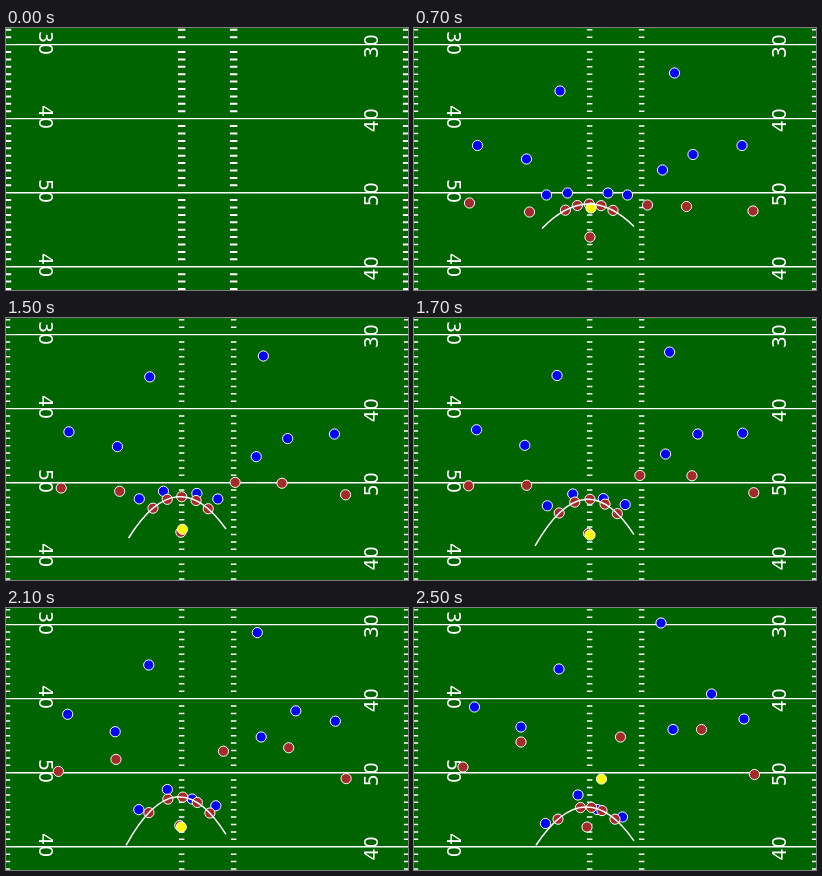
Recreate the animation shown at these times as an HTML page. Size 402 by 262 pixels, loop 2.6 s.

```html
<!DOCTYPE html>
<html lang="en">
<head>
<meta charset="utf-8">
<title>Football play</title>
<style>
  html, body { margin: 0; width: 100%; height: 100%; overflow: hidden; background: #006400; }
  svg { display: block; width: 402px; height: 262px; }
  text { font: 18.97px "DejaVu Sans", sans-serif; fill: #fff; text-anchor: middle; }
  .yard { stroke: #fff; stroke-width: 1.42; }
  .hash { stroke: #fff; stroke-width: 1.5; fill: none; }
  .bold { stroke-width: 2; stroke-linecap: square; }
  circle { stroke: #fff; stroke-width: 1; }
  .blue { fill: #00f; }
  .red { fill: #a52a2a; }
  .ball { fill: #ff0; }
  #pocket { fill: none; stroke: #fff; stroke-width: 1.5; }
</style>
</head>
<body>
<svg viewBox="0 0 402 262">
  <g id="field"></g>
  <g id="play">
    <g id="players"></g>
    <path id="pocket"/>
  </g>
</svg>
<script>
const STEP = 100, LOOP = 2600, SNAP = 7, END = 18, CATCH = 10, THROW = 15;
const $ = id => document.getElementById(id);

function add(parent, tag, attrs, text) {
  const el = document.createElementNS('http://www.w3.org/2000/svg', tag);
  for (const k in attrs) el.setAttribute(k, attrs[k]);
  if (text) el.textContent = text;
  parent.append(el);
  return el;
}

// Field
const TOP = 16.6, GAP = 74.05, SHIFT = 1.6;
let dashes = '';
for (let k = -2; k < 34; k++) {
  if (k % 10 === 0) continue;
  const y = (TOP + k * GAP / 10).toFixed(1);
  for (const x of [-1.3, 172.9, 224.9, 397.9]) dashes += `M${x} ${y}h5.5`;
}
const hash = add($('field'), 'path', { class: 'hash', d: dashes });
[30, 40, 50, 40].forEach((n, i) => {
  const y = TOP + i * GAP;
  add($('field'), 'line', { class: 'yard', x1: 0, x2: 402, y1: y, y2: y });
  add($('field'), 'text', { transform: `translate(39.8 ${y - SHIFT}) rotate(90)`, y: 6.9 }, n);
  add($('field'), 'text', { transform: `translate(365 ${y + SHIFT}) rotate(-90)`, y: 6.9 }, n);
});

// Motion: wait, gain speed evenly for `rise` steps, then run on at full speed
function progress(u, rise = 8, wait = 0) {
  const dist = t => t < rise ? t * t / (2 * rise) : t - rise / 2;
  return dist(Math.max(0, u - wait)) / dist(END - wait);
}
const mix = (a, b, f, bend = 0) => a + (b - a) * f + bend * 4 * f * (1 - f);

function run(x0, y0, x1, y1, { rise, wait, bend = [0, 0] } = {}) {
  return u => {
    const f = progress(u, rise, wait);
    return [mix(x0, x1, f, bend[0]), mix(y0, y1, f, bend[1])];
  };
}

// The pocket is a parabola that deepens and sinks after the snap
function pocketAt(u) {
  const f = progress(u);
  const apex = mix(175, 172.5, f);
  const top = mix(176, 199, progress(u, 12, 3));
  const curve = mix(.0111, .015, f, .004);
  return {
    left: mix(128, 122, f, -4.5), right: 220, apex, top, curve,
    y: x => top + curve * (x - apex) ** 2
  };
}

// Linemen stay on the pocket line, bowing outwards
const lineman = (slot, endX) => u => {
  const x = mix(175.2 + 11.9 * slot, endX, progress(u, 12), 4 * Math.sign(slot));
  return [x, pocketAt(u).y(x)];
};

const passer = run(176, 209, 173, 219, { rise: 4, bend: [0, 1.5] });

const defense = [
  // secondary
  run(146, 63, 145, 61, { rise: 12, bend: [-2.9, -5.3] }),
  run(260.5, 45, 247, 15, { rise: 11 }),
  run(63.5, 117.5, 60.5, 99, { rise: 17 }),
  run(112.5, 131, 107, 119, { rise: 18 }),
  run(248.5, 142, 259, 121.5, { rise: 10, wait: 2 }),
  run(279, 126.5, 297.5, 86, { rise: 13, wait: 2 }),
  run(328, 117.5, 330, 111, { rise: 12 }),
  // rush
  run(132.5, 167, 131.5, 215.5, { bend: [1.3, 0] }),
  run(153.5, 165, 164, 187, { rise: 4 }),
  run(194, 165, 183, 201.5),
  run(213.5, 167, 208.5, 209, { rise: 6 })
];
const offense = [
  lineman(-2, 144), lineman(-1, 166.5), lineman(0, 177.5), lineman(1, 188), lineman(2, 201),
  passer,
  // receivers
  run(55.5, 175, 49, 159, { rise: 7, bend: [2, 0] }),
  run(115.5, 184, 107, 134, { rise: 13 }),
  run(233.5, 177, 206.5, 129, { rise: 9, bend: [3.5, 0] }),
  run(272.5, 178.5, 287.5, 121.5, { rise: 11 }),
  run(339, 183, 340.5, 166.5, { rise: 4 })
];

// Ball: on the ground, snapped back, held, thrown
function ballAt(u) {
  if (u < 0) return [176.5, 175];
  const [px, py] = passer(u), hand = [px + 1.5, py + 1.5];
  if (u > THROW) {
    const f = (u - THROW) / (END - THROW);
    return [mix(175, 187.5, f), mix(220, 171, f)];
  }
  const f = 1 - (1 - Math.min(1, u / CATCH)) ** 1.3;
  return [mix(177, hand[0], f), mix(180, hand[1], f)];
}

const actor = (cls, at) => ({ el: add($('players'), 'circle', { class: cls, r: 5.1 }), at });
const actors = [
  ...defense.map(at => actor('blue', at)),
  ...offense.map(at => actor('red', at)),
  actor('ball', ballAt)
];

function draw(step) {
  const empty = step === 0, u = step - SNAP;
  $('play').style.display = empty ? 'none' : '';
  hash.classList.toggle('bold', empty);

  for (const { el, at } of actors) {
    const [x, y] = at(u);
    el.setAttribute('cx', x.toFixed(2));
    el.setAttribute('cy', y.toFixed(2));
  }
  const { left, right, apex, top, curve, y } = pocketAt(u);
  const ctrl = top + curve * (left - apex) * (right - apex);
  $('pocket').setAttribute('d', `M${left} ${y(left)}Q${(left + right) / 2} ${ctrl} ${right} ${y(right)}`);
}

const start = performance.now();
let shown = -1;
function tick() {
  const step = Math.floor((performance.now() - start) % LOOP / STEP);
  if (step !== shown) draw(shown = step);
  requestAnimationFrame(tick);
}
tick();
</script>
</body>
</html>
```
